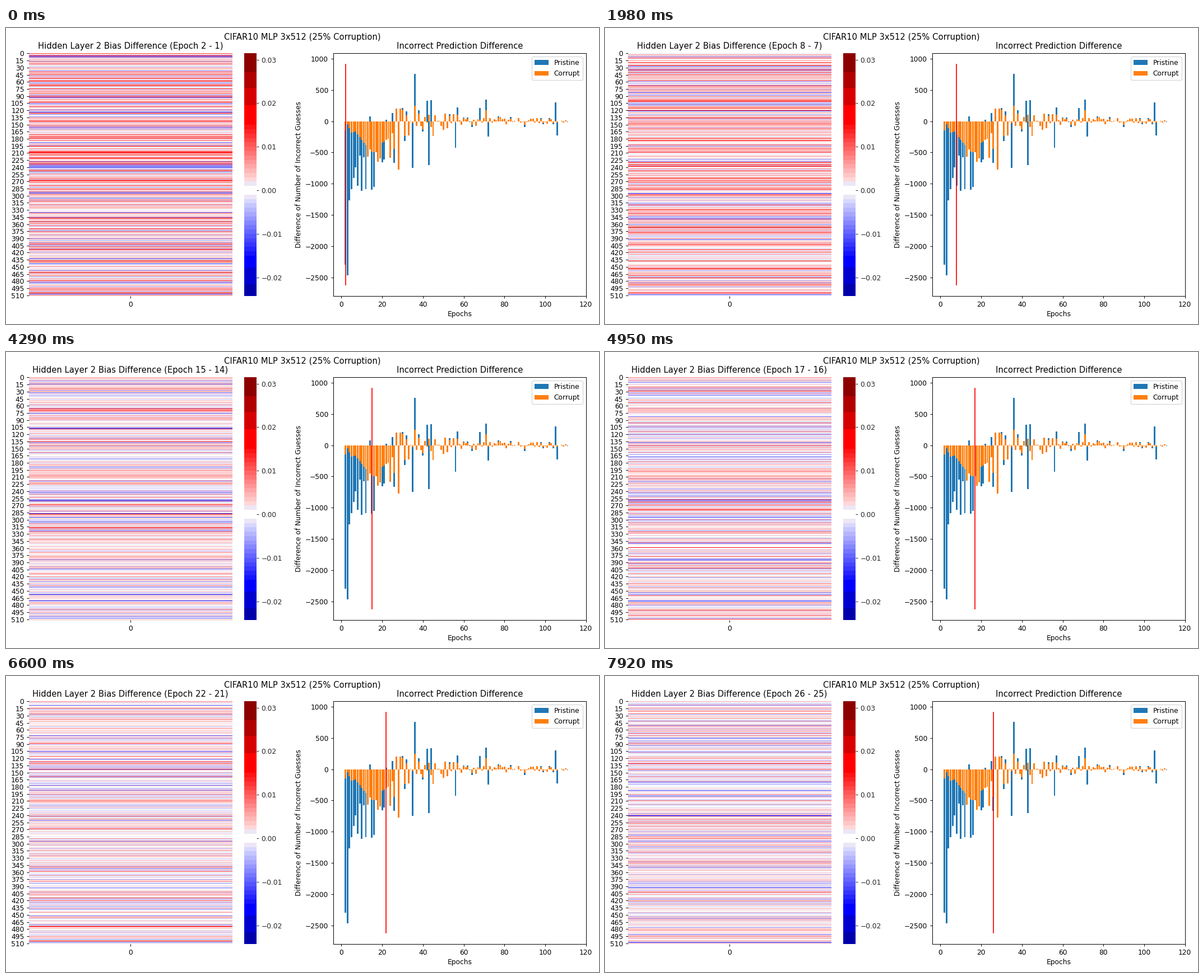
Write a matplotlib script that moves like this. It is 1058x529 px and loops after 8 s.

```python
import numpy as np
import matplotlib.pyplot as plt
from matplotlib.animation import FuncAnimation
from matplotlib.colors import BoundaryNorm, ListedColormap
from matplotlib.patches import PathPatch
from matplotlib.path import Path

W, H = 1058, 529
LOOP, INTERVAL, EPOCH_MS = 8000, 50, 330
ROWS, FIRST, LAST = 512, 2, 26
END = 114  # last epoch of the bar chart

plt.rcParams["font.family"] = "DejaVu Sans"


def bias_table():
    """Bias differences in thousandths, one line of rows per epoch."""
    rng = np.random.default_rng(12)
    steady = rng.laplace(0, 0.7, ROWS)
    steady[[70, 143, 159, 326, 437, 476]] = 2.4
    steady[[28, 139, 251, 293, 311, 393, 458]] = -3
    noise = rng.laplace(0, 0.7, ROWS)
    table = []
    for e in range(FIRST, LAST + 1):
        spread = 4.1 + 2 * np.exp((FIRST - e) / 6)
        mean = 0.9 + 3 * np.exp(-((e - 5) / 4) ** 2)
        noise = 0.55 * noise + 0.83 * rng.laplace(0, 0.7, ROWS)
        table.append(mean + spread * (0.5 * steady + 0.85 * noise))
    return np.array(table)


def along(epochs, points):
    return np.interp(epochs, *zip(*points))


def with_peaks(values, peaks):
    for epoch, value in peaks.items():
        values[epoch - FIRST] = value
    return values


def guess_changes():
    """Steep early gains, then noise that dies out, with a few peaks."""
    rng = np.random.default_rng(5)
    e = np.arange(FIRST, END + 1)
    late = (250 * np.exp((27 - e) / 30) + 25) * np.clip((113 - e) / 6, 0, 1)
    wobble = late * rng.uniform(-1, 1, e.size)

    early = along(e, [(2, -145), (3, -45), (5, -180), (7, -160), (11, -345),
                      (15, -490), (17, -500), (18, -650), (19, -590),
                      (20, -345), (23, -280)])
    corrupt = with_peaks(np.where(e < 27, early, wobble), {
        13: -565, 24: -585, 25: -190, 26: -440, 28: -775, 36: 245, 45: -240,
        71: 175})

    early = along(e, [(2, -2300), (3, -2465), (4, -1265), (7, -735),
                      (10, -850), (16, -790), (17, -450), (19, -450),
                      (20, -655), (21, -615), (22, 25)])
    early -= np.where((e > 7) & (e < 17), 260 * (-1.0) ** e, 0)
    later = corrupt * rng.uniform(0, 1.7, e.size)
    pristine = with_peaks(np.where(e < 23, early, later), {
        14: 80, 15: -1100, 25: 135, 28: 0, 35: -745, 36: 757, 42: 325,
        43: -700, 44: 340, 56: -420, 57: 220, 68: 210, 71: 350, 72: -245,
        105: 305, 106: -230})
    return pristine, corrupt


def banded_cmap():
    steps = list(range(1, 16))
    bounds = ([-24.3, -21.6, -17.8] + [-s for s in reversed(steps)]
              + steps + [19.5, 23.5, 27.1, 31.5])
    tints = [1 - (k + 0.5) / 15.75 for k in range(2, 15)]
    pale = (0.925, 0.9, 0.96)
    blues = [(0, 0, 0.67), (0, 0, 0.82), (0, 0, 1)]
    blues += [(t, t, 1) for t in reversed(tints)] + [pale]
    reds = [pale] + [(1, t, t) for t in tints]
    reds += [(1, 0, 0), (0.84, 0, 0), (0.69, 0, 0), (0.55, 0, 0)]
    colors = blues + [(1, 1, 1)] + reds
    return bounds, ListedColormap(colors), BoundaryNorm(bounds, len(colors))


def add_box(x0, y0, x1, y1):
    return fig.add_axes([x0 / W, 1 - y1 / H, (x1 - x0) / W, (y1 - y0) / H])


def add_bars(ax, heights, color, label):
    verts, codes = [], []
    for x, h in enumerate(heights, FIRST):
        a, b = x - 0.4, x + 0.4
        verts += [(a, 0), (b, 0), (b, h), (a, h), (a, 0)]
        codes += [Path.MOVETO] + [Path.LINETO] * 3 + [Path.CLOSEPOLY]
    ax.add_patch(PathPatch(Path(verts, codes), fc=color, lw=0, label=label))


fig = plt.figure(figsize=(12, 6), dpi=88.17, facecolor="white")
fig.suptitle("CIFAR10 MLP 3x512 (25% Corruption)", y=0.9825)
bounds, cmap, norm = banded_cmap()
table = np.clip(bias_table(), bounds[0] + 0.1, bounds[-1] - 0.1)

# Heat map of the rows
heat = add_box(41, 45, 403, 479)
heat.spines[:].set_visible(False)
image = heat.imshow(table[0][:, None], cmap=cmap, norm=norm, aspect="auto",
                    interpolation="nearest", extent=(0, 1, ROWS, 0))
ticks = range(0, ROWS, 15)
heat.set_yticks([t + 0.5 for t in ticks], [str(t) for t in ticks])
heat.set_xticks([0.5], ["0"])
title = heat.set_title("", pad=6.7)

# Colour scale
scale = add_box(425, 45, 447, 479)
scale.spines[:].set_visible(False)
mids = (np.array(bounds[1:]) + bounds[:-1]) / 2
scale.pcolormesh([0, 1], bounds, mids[:, None], cmap=cmap, norm=norm)
scale.set_ylim(bounds[0], bounds[-1])
scale.set_xticks([])
scale.yaxis.tick_right()
marks = range(-20, 31, 10)
scale.set_yticks(marks, [f"{m / 1000:.2f}".replace("-", "\u2212")
                         for m in marks])
scale.tick_params(colors="#262626")

# Bar chart
chart = add_box(583.7, 45, 1034.8, 479)
pristine, corrupt = guess_changes()
add_bars(chart, pristine, "C0", "Pristine")
add_bars(chart, corrupt, "C1", "Corrupt")
marker, = chart.plot([FIRST, FIRST], [-2621, 913], color="red", lw=1.4)
chart.set_xlim(-4.04, 120.04)
chart.set_ylim(-2798, 1090)
chart.set_xticks(range(0, 121, 20))
chart.set_yticks(range(-2500, 1001, 500))
chart.set_title("Incorrect Prediction Difference", pad=6.7)
chart.set_xlabel("Epochs")
chart.set_ylabel("Difference of Number of Incorrect Guesses")
chart.legend(loc="upper right")


def update(frame):
    step = ((frame + 1) * INTERVAL - 1) // EPOCH_MS
    epoch = FIRST + step
    image.set_data(table[step][:, None])
    title.set_text(
        f"Hidden Layer 2 Bias Difference (Epoch {epoch} - {epoch - 1})")
    marker.set_xdata([epoch, epoch])
    return image, title, marker


anim = FuncAnimation(fig, update, frames=LOOP // INTERVAL, interval=INTERVAL,
                     repeat=True, repeat_delay=0, blit=False)
plt.show()
```
